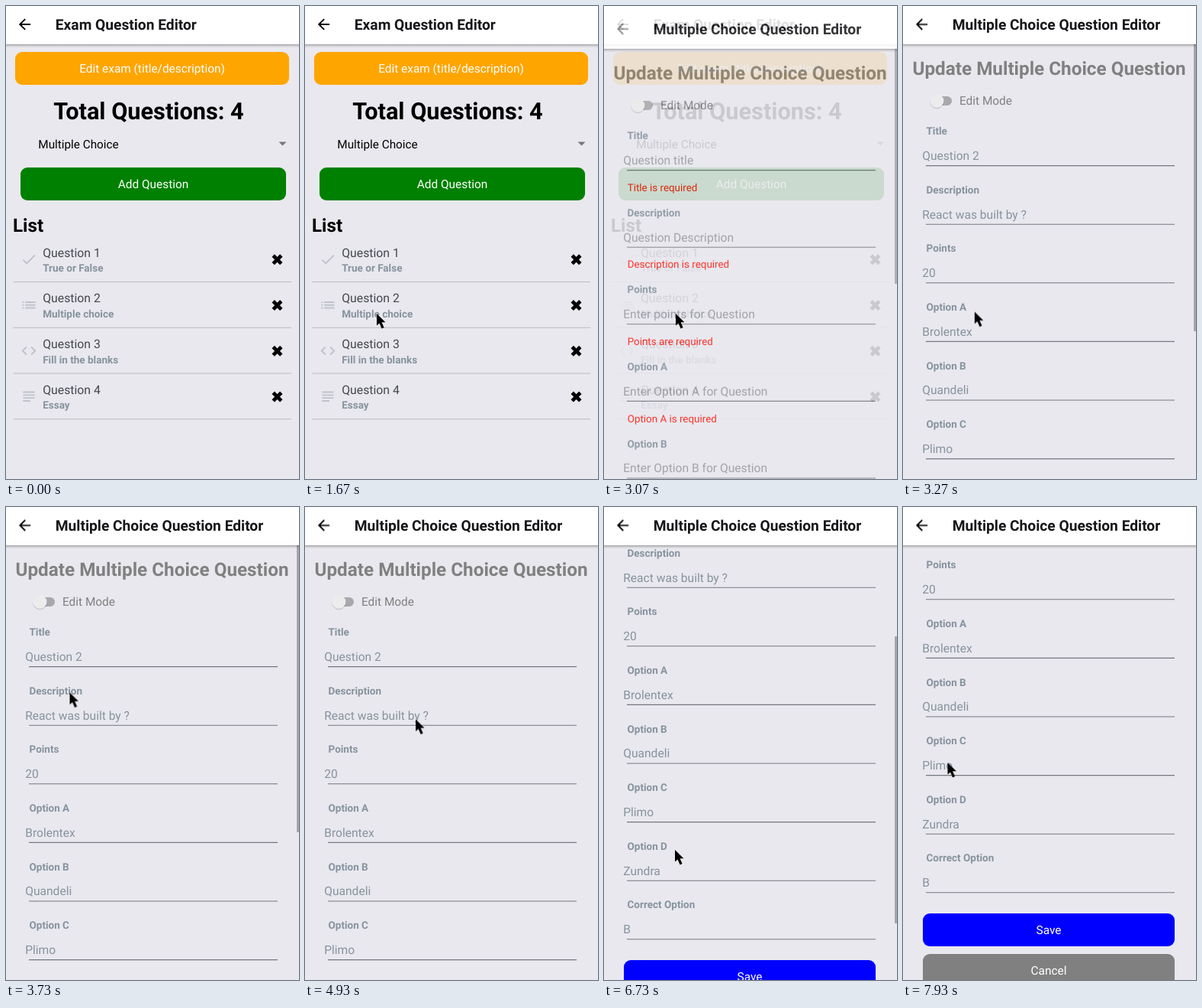
An HTML page for the animation above (8 s loop, 384 by 618 pixels).

```html
<!DOCTYPE html>
<html lang="en">
<head>
<meta charset="utf-8">
<title>Exam Question Editor</title>
<style>
  html, body { margin: 0; width: 100%; height: 100%; overflow: hidden; background: #e9e8ee; }
  svg { display: block; width: 384px; height: 618px; font-family: Roboto, sans-serif; text-rendering: geometricPrecision; }
  .bg { fill: #e9e8ee; }
  .mid { text-anchor: middle; }
  .bar { font-size: 19.2px; font-weight: 600; fill: #16161a; }
  .total { font-size: 30.7px; font-weight: 700; }
  .list { font-size: 24.2px; font-weight: 700; }
  .title { font-size: 24.25px; font-weight: 700; fill: #808080; }
  .button { font-size: 15.4px; fill: #fff; }
  .spinner { font-size: 15.3px; }
  .mode { font-size: 15.4px; fill: #808080; }
  .item { font-size: 15.8px; fill: #43484d; }
  .label { font-size: 13.5px; font-weight: 700; fill: #86939e; }
  .value { font-size: 15.6px; fill: #86939e; }
  .hint { font-size: 15.6px; fill: #98999e; }
  .error { font-size: 13.4px; fill: #ff190c; }
  .icon { fill: #bfc3c9; }
  .cross { stroke: #000; stroke-width: 4.8; }
  .divider { stroke: #bcbbc1; stroke-width: 1.2; }
  .rule { stroke: #75787f; stroke-width: 1.1; }
  .thumb { fill: #a6a5aa; }

  .page, .arrow, .blank, .filled, .scroll, .track, .fade, .cursor { animation: 8s linear infinite; }
  .page { animation-name: open; }
  .arrow { animation-name: arrow; }
  .blank { animation-name: blank; animation-timing-function: step-end; }
  .filled { animation-name: filled; animation-timing-function: step-end; }
  .scroll { animation-name: scroll; animation-timing-function: step-end; }
  .track { animation-name: track; animation-timing-function: step-end; }
  .fade { animation-name: fade; }
  .cursor { animation-name: cursor; }

  @keyframes open {
    0%, 35.5% { opacity: 0; transform: translateY(49px); }
    36.625% { opacity: .45; transform: translateY(27px); }
    37.5% { opacity: .72; transform: translateY(14px); }
    38.375% { opacity: .865; transform: translateY(6px); }
    39.125%, 40.87% { opacity: .965; transform: translateY(1.5px); }
    40.875%, 100% { opacity: 1; transform: none; }
  }
  @keyframes arrow {
    0%, 36% { opacity: 0; }
    38.375% { opacity: .52; }
    39.125%, 40.87% { opacity: .75; }
    40.875%, 100% { opacity: 1; }
  }
  @keyframes blank { 0% { opacity: 1; } 40.875%, 100% { opacity: 0; } }
  @keyframes filled { 0% { opacity: 0; } 40.875%, 100% { opacity: 1; } }
  @keyframes scroll {
    0% { transform: none; }
    79.125% { transform: translateY(-60px); }
    81.625% { transform: translateY(-120px); }
    84.125% { transform: translateY(-180px); }
    88.375%, 100% { transform: translateY(-241px); }
  }
  @keyframes track {
    0% { transform: none; }
    79.125% { transform: translateY(40px); }
    81.625% { transform: translateY(80px); }
    84.125% { transform: translateY(119px); }
    88.375%, 100% { transform: translateY(160px); }
  }
  @keyframes fade {
    0%, 51.6% { opacity: 1; }
    55%, 79.12% { opacity: 0; }
    79.125%, 92% { opacity: 1; }
    95.5%, 100% { opacity: 0; }
  }
  @keyframes cursor {
    0%, 4.12% { transform: translate(-30px, 600px); }
    4.125% { transform: translate(368px, 604px); }
    7.5% { transform: translate(200px, 568px); }
    10.875% { transform: translate(5px, 538px); }
    11.625%, 15.87% { transform: translate(-30px, 530px); }
    15.875% { transform: translate(2px, 405px); }
    20.875%, 40.8% { transform: translate(94px, 402px); }
    46.625% { transform: translate(83.5px, 242.5px); }
    50.875% { transform: translate(97px, 258px); }
    56% { transform: translate(126px, 274px); }
    62.5%, 65.8% { transform: translate(148px, 278px); }
    75.875% { transform: translate(99px, 436px); }
    77.5% { transform: translate(96.5px, 442.5px); }
    79.125%, 91% { transform: translate(93px, 448px); }
    98.375% { transform: translate(44px, 336px); }
    99.125%, 100% { transform: translate(58.5px, 334px); }
  }
</style>
</head>
<body>
<svg id="stage" viewBox="0 0 384 618">
  <defs>
    <linearGradient id="shade" x2="0" y2="1">
      <stop offset="0" stop-color="#000" stop-opacity=".32"/>
      <stop offset=".4" stop-color="#000" stop-opacity=".13"/>
      <stop offset="1" stop-color="#000" stop-opacity="0"/>
    </linearGradient>
  </defs>
</svg>
<script>
  const text = (x, y, cls, str) => `<text x="${x}" y="${y}" class="${cls}">${str}</text>`;
  const line = (x1, x2, y, cls) => `<path class="${cls}" d="M${x1} ${y}H${x2}"/>`;
  const button = (x, y, w, fill, label, cx) =>
    `<rect x="${x}" y="${y}" width="${w}" height="43" rx="9" fill="${fill}"/>` + text(cx, y + 27.4, 'button mid', label);
  const icon = (cx, cy, d, cls) =>
    `<path class="${cls}" transform="translate(${cx} ${cy}) scale(.95) translate(-12 -12)" d="${d}"/>`;
  const background = '<rect class="bg" y="50" width="384" height="568"/>';

  const back = 'M20 11H7.83l5.59-5.59L12 4l-8 8 8 8 1.41-1.41L7.83 13H20z';
  const header = (title, cls) =>
    '<rect y="50" width="384" height="4.5" fill="url(#shade)"/><rect width="384" height="50" fill="#fff"/>' +
    icon(24.5, 24, back, cls) + text(64.8, 31, 'bar', title);

  // Question list
  const kinds = [
    ['True or False', 'M9 16.17L4.83 12l-1.42 1.41L9 19 21 7l-1.41-1.41z'],
    ['Multiple choice', 'M3 11h2v2H3zM3 15h2v2H3zM3 7h2v2H3zM7 11h14v2H7zM7 15h14v2H7zM7 7h14v2H7z'],
    ['Fill in the blanks', 'M9.4 16.6L4.8 12l4.6-4.6L8 6l-6 6 6 6zM14.6 16.6l4.6-4.6-4.6-4.6L16 6l6 6-6 6z'],
    ['Essay', 'M4 17h10v2H4zM4 9h16v2H4zM4 13h16v2H4zM4 5h16v2H4z']
  ];
  const items = kinds.map(([kind, shape], i) => `<g transform="translate(0 ${i * 59.75})">` +
    icon(30, 331, shape, 'icon') +
    text(48.2, 327.5, 'item', 'Question ' + (i + 1)) +
    text(48.2, 347, 'label', kind) +
    '<path class="cross" d="M350.2 326l10.6 10.6M360.8 326l-10.6 10.6"/>' +
    line(9.5, 374, 360.5, 'divider') + '</g>').join('');

  const listPage = background + header('Exam Question Editor', '') +
    button(12, 60, 359, '#ffa500', 'Edit exam (title/description)', 191.5) +
    text(187, 147.5, 'total mid', 'Total Questions: 4') +
    text(42.3, 185.5, 'spinner', 'Multiple Choice') +
    '<path d="M357.5 177.5h10l-5 5z" fill="#77777b"/>' +
    button(19, 211, 348, '#008000', 'Add Question', 193) +
    text(9, 295, 'list', 'List') + items;

  // Question form
  const fields = [
    ['Title', 'Question 2', 'Question title'],
    ['Description', 'React was built by ?', 'Question Description'],
    ['Points', '20', 'Enter points for Question'],
    ['Option A', 'Brolentex'],
    ['Option B', 'Quandeli'],
    ['Option C', 'Plimo'],
    ['Option D', 'Zundra'],
    ['Correct Option', 'B']
  ];
  const rows = (pitch, content) => fields.map((field, i) => `<g transform="translate(0 ${i * pitch})">` +
    text(30.5, 168.2, 'label', field[0]) + line(30, 356, 208.6, 'rule') + content(field) + '</g>').join('');

  const blankRows = rows(100.6, ([name, , hint]) =>
    text(25.2, 201, 'hint', hint || `Enter ${name} for Question`) +
    text(30.7, 235.8, 'error', `${name} ${name === 'Points' ? 'are' : 'is'} required`));
  const filledRows = rows(76.6, ([, value]) => text(25.2, 201, 'value', value));

  const formPage = background + '<g class="scroll">' +
    text(191.5, 90, 'title mid', 'Update Multiple Choice Question') +
    '<rect x="37" y="118" width="27" height="12" rx="6" fill="#a9a8ab"/>' +
    '<circle cx="44.5" cy="125" r="9.2" fill="#000" opacity=".14"/><circle cx="44.5" cy="124" r="9" fill="#ececec"/>' +
    text(74, 129.4, 'mode', 'Edit Mode') +
    `<g class="blank">${blankRows}</g><g class="filled">${filledRows}` +
    button(26, 772, 330, '#0000ff', 'Save', 191) +
    button(26, 825, 330, '#808080', 'Cancel', 191) + '</g></g>' +
    '<rect class="thumb blank" x="381" y="50" width="3" height="307"/>' +
    '<g class="filled"><g class="fade"><rect class="thumb track" x="381" y="50" width="3" height="375"/></g></g>' +
    header('Multiple Choice Question Editor', 'arrow');

  const cursor = '<path class="cursor" d="M0 0V15.6L3.5 12.4 6.6 19.4 9.6 18.1 6.5 11.3H11.4z"/>';

  document.getElementById('stage').insertAdjacentHTML('beforeend',
    `<g>${listPage}</g><g class="page">${formPage}</g>${cursor}`);
</script>
</body>
</html>
```
